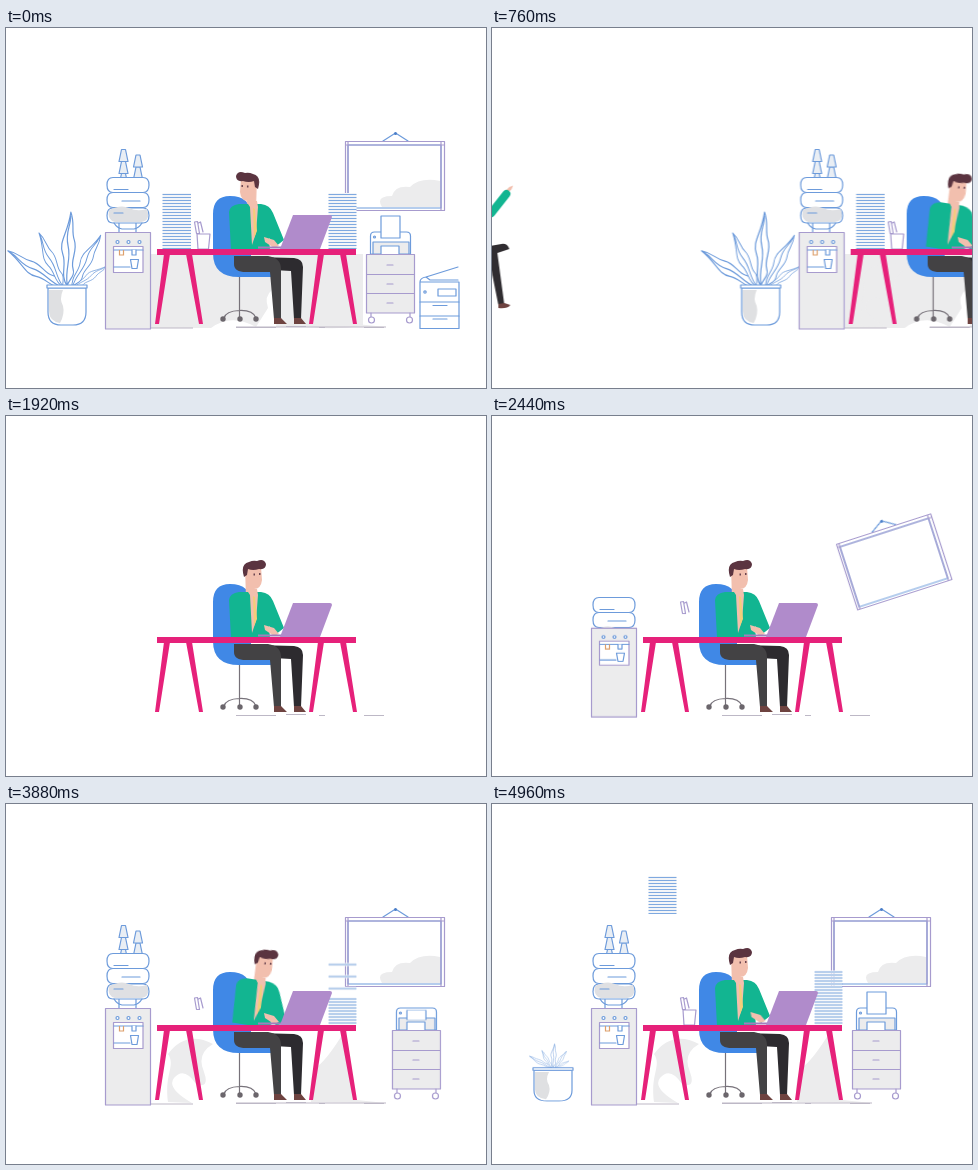
These frames come from a looping animation (480 px wide and 360 px high, 5000 ms). An HTML page without scripts:

```html
<!DOCTYPE html>
<html lang="en">
<head>
<meta charset="utf-8">
<title>Office assembly</title>
<style>
html, body { margin: 0; width: 100%; height: 100%; overflow: hidden; background: #fff; }
svg { display: block; width: 100%; height: 100%; }

:root { --blue: #6d9bdb; --violet: #a79bce; --grey: #ececed; --pink: #e6217a; --teal: #12b591; --skin: #f2bfae; --hair: #5b3440; --chair: #4088e6; }
.blue, .violet { fill: #fff; stroke: var(--blue); stroke-width: 1.2; stroke-linejoin: round; stroke-linecap: round; }
.violet { stroke: var(--violet); }
.line { fill: none; }
.grey { fill: var(--grey); }
.pink { fill: var(--pink); }
.teal { fill: var(--teal); }
.skin { fill: var(--skin); }
.hair { fill: var(--hair); }
.chair { fill: var(--chair); }
.limb { fill: none; stroke-linecap: round; stroke-linejoin: round; }

/* One 5 s clock for everything: 1% = 50 ms */
.a { animation: 5s linear infinite; }

.slide { animation-name: slide; }
@keyframes slide {
  0%, 8% { transform: none; }
  11.2% { transform: translateX(62px); }
  15.2% { transform: translateX(207px); }
  23.2%, 24% { transform: translateX(480px); }
  24.01%, 100% { transform: none; }
}

.station { animation-name: station; }
@keyframes station { 0%, 24% { opacity: 1; } 24.01%, 37.5% { opacity: 0; } 37.51%, 100% { opacity: 1; } }

.first { animation-name: first; }
@keyframes first { 0%, 24% { opacity: 1; } 24.01%, 100% { opacity: 0; } }

.lean { animation-name: lean; transform-origin: 248px 228px; }
@keyframes lean {
  0%, 4% { transform: none; }
  8%, 24% { transform: rotate(9deg); }
  36%, 50% { transform: none; }
  57%, 88% { transform: rotate(9deg); }
  96%, 100% { transform: none; }
}
.turn { animation-name: turn; transform-origin: 245px 160px; }
@keyframes turn { 0%, 4% { transform: scaleX(-1); } 4.01%, 100% { transform: none; } }
.type { animation: type .24s steps(2) infinite; }
@keyframes type { to { transform: translate(1px, -2px); } }

.boss { animation-name: boss; }
@keyframes boss {
  0%, 8% { transform: translateX(-443px); opacity: 1; }
  15.2% { transform: translateX(-236px); }
  23.2% { transform: translateX(-90px); }
  27%, 37.5% { transform: none; opacity: 1; }
  37.51%, 100% { transform: none; opacity: 0; }
}
.point { animation-name: point; transform-origin: 235px 185px; }
@keyframes point { 0%, 28% { transform: none; } 31% { transform: rotate(8deg); } 34%, 100% { transform: none; } }
.front { animation-name: front; }
@keyframes front {
  0%, 22.8% { transform: translateX(340px); opacity: 1; }
  27%, 37.5% { transform: none; opacity: 1; }
  37.51%, 100% { opacity: 0; }
}
.panel { animation-name: panel; transform-origin: 0 221px; }
@keyframes panel { 0%, 34.4% { transform: none; } 37.5%, 100% { transform: scaleY(.12); } }

.board { animation-name: board; transform-origin: 389px 105px; }
@keyframes board {
  0%, 24% { transform: none; opacity: 1; }
  24.01%, 40% { transform: scale(.2); opacity: 0; }
  40.01% { transform: scale(.2) rotate(10deg); opacity: 1; }
  44% { transform: rotate(6deg); }
  48.8% { transform: rotate(-18deg); }
  54% { transform: rotate(9deg); }
  59% { transform: rotate(-6deg); }
  62% { transform: rotate(2deg); }
  64% { transform: rotate(-2deg); }
  68%, 100% { transform: none; opacity: 1; }
}
.gleam { animation-name: gleam; }
@keyframes gleam { 0%, 24% { opacity: 1; } 24.01%, 73% { opacity: 0; } 73.01%, 100% { opacity: 1; } }

.cooler { animation-name: cooler; transform-origin: 0 301px; }
@keyframes cooler {
  0%, 24% { transform: none; opacity: 1; }
  24.01%, 45% { transform: scaleY(.6); opacity: 0; }
  45.01% { transform: scaleY(.6); opacity: 1; }
  48.8% { transform: scaleY(.92); }
  64% { transform: scaleY(.98); }
  70%, 100% { transform: none; opacity: 1; }
}
.jug { animation-name: jug; }
@keyframes jug {
  0%, 24% { transform: none; opacity: 1; }
  24.01%, 45% { transform: translateY(50px); opacity: 0; }
  45.01% { transform: translateY(50px); opacity: 1; }
  48.8% { transform: translateY(32px); }
  64% { transform: translateY(9px); }
  70%, 100% { transform: none; opacity: 1; }
}
.cups { animation-name: cups; }
@keyframes cups {
  0%, 24% { transform: none; opacity: 1; }
  24.01%, 54% { transform: translateY(-60px); opacity: 0; }
  54.01% { transform: translateY(-60px); opacity: 1; }
  64% { transform: translateY(var(--mid)); }
  70%, 100% { transform: none; opacity: 1; }
}
.pens { animation-name: pens; }
@keyframes pens {
  0%, 24% { transform: none; opacity: 1; }
  24.01%, 45% { transform: translateY(-14px); opacity: 0; }
  45.01% { transform: translateY(-14px); opacity: 1; }
  48.8% { transform: translateY(-8px); }
  54%, 100% { transform: none; opacity: 1; }
}
.mug { animation-name: mug; }
@keyframes mug { 0%, 24% { opacity: 1; } 24.01%, 90% { opacity: 0; } 90.01%, 100% { opacity: 1; } }

.pile { animation-name: pile; }
@keyframes pile {
  0%, 56.8% { transform: translateY(-24px); opacity: 0; }
  56.81% { transform: translateY(-24px); opacity: 1; }
  60%, 100% { transform: none; opacity: 1; }
}
.pile use { animation: fall 5s linear calc(var(--i) * 46ms - 5s) infinite; }
.pile .late { animation: lateFall 5s linear calc(var(--i) * 46ms - 4.6s) infinite; }
@keyframes fall {
  0%, 60.1% { transform: translateY(calc(var(--i) * -3px - 98px)); }
  70.1%, 100% { transform: translateY(calc(var(--i) * -3px)); }
}
@keyframes lateFall {
  0%, 60.1% { transform: translateY(calc(var(--i) * -3px - 60px)); opacity: 0; }
  60.11% { opacity: 1; }
  66%, 100% { transform: translateY(calc(var(--i) * -3px)); opacity: 1; }
}
.hang { animation-name: hang; }
@keyframes hang {
  0%, 92% { transform: translateY(-14px); opacity: 0; }
  92.01% { transform: translateY(-14px); opacity: 1; }
  99%, 100% { transform: none; opacity: 1; }
}

.cabinet { animation-name: cabinet; }
@keyframes cabinet {
  0%, 24% { transform: none; opacity: 1; }
  24.01%, 73% { transform: translateX(69px); opacity: 0; }
  73.01% { transform: translateX(69px); opacity: 1; }
  77.6% { transform: translateX(26px); }
  82%, 100% { transform: none; opacity: 1; }
}
.paper { animation-name: paper; transform-origin: 0 210px; }
@keyframes paper {
  0%, 24% { transform: none; }
  24.01%, 78% { transform: translateY(6px) scaleY(.45); }
  85%, 100% { transform: none; }
}

.pot { animation-name: pot; transform-origin: 0 297px; }
@keyframes pot {
  0%, 24% { transform: none; opacity: 1; }
  24.01%, 84% { transform: scaleY(.1); opacity: 0; }
  84.01% { transform: scaleY(.1); opacity: 1; }
  90%, 100% { transform: scaleY(.83); opacity: 1; }
}
.leaves { animation-name: leaves; transform-origin: 61px 266px; }
@keyframes leaves {
  0%, 24% { transform: none; opacity: 1; }
  24.01%, 91% { transform: scale(.02); opacity: 0; }
  91.01% { transform: scale(.02); opacity: 1; }
  99%, 100% { transform: scale(.4, .32); opacity: 1; }
}
</style>
</head>
<body>
<svg viewBox="0 0 480 360">
  <defs>
    <pattern id="sheets" width="40" height="3" patternUnits="userSpaceOnUse">
      <path fill="#f3f5f8" d="M0 0h40v3H0z"/>
      <path stroke="#7fa9e0" d="M0 1.5h40"/>
    </pattern>
    <g id="sheet">
      <path fill="#f3f5f8" d="M323 217.500h27v3h-27z"/>
      <path stroke="#7fa9e0" d="M322.500 219H350.500"/>
    </g>
    <path id="cup" class="blue" style="fill:#e9eef4" d="M2.500 0h4l2.500 12h-9z"/>
    <g id="tower">
      <use href="#cup" y="48"/><use href="#cup" y="36"/><use href="#cup" y="24"/><use href="#cup" y="12"/><use href="#cup"/>
    </g>
    <path id="leaf" class="blue" d="M0 0C-8-12-1-20-6-32S-2-52 0-74C5-62 1-56 5-46S2-26 5-18 2-8 0 0M0-2C-3-18 3-26-1-40S1-60 0-70"/>
    <path id="lobe" class="blue" d="M107 0h30q6 0 6 7.500t-6 7.500h-30q-6 0-6-7.500t6-7.500z"/>
    <path id="deskLegs" class="pink" d="M158 226h6l-11 70h-4zM180 226h6l11 70h-4z"/>
  </defs>

  <g class="a slide">
    <path class="a first grey" d="M145 226H357V298Q330 302 300 299H270Q274 270 266 262 258 268 262 280L250 299Q225 285 205 300H145z"/>
    <g class="a gleam grey">
      <path d="M162 298C158 270 170 262 162 250Q180 226 207 240 190 250 198 268 204 285 190 280 178 262 168 274 160 284 186 299z"/>
      <path d="M305 298Q302 270 312 262T338 228L350 296 380 299z"/>
    </g>
    <g fill="none" stroke="#bdb8c6" stroke-width="1.200">
      <path class="a station" d="M230 299.500h40M280 298.500h20M313 299.500h6M358 299.500h20"/>
      <path class="a gleam" d="M145 300h42M230 299h150"/>
    </g>

    <g class="a board">
      <path class="blue line" d="M377 113l12.500-8 12.500 8"/>
      <circle cx="389.500" cy="105.500" r="1.500" fill="#4b7ec8"/>
      <path class="violet" d="M339.500 113.500h99v69h-99z"/>
      <path class="blue" d="M342 117h93v63h-93z"/>
      <path class="a gleam grey" d="M376 179Q369 168 386 168 389 157 404 159 414 149 434 153V179z"/>
      <path class="violet line" d="M340 117h98M435 114v68M342 114v68"/>
    </g>

    <g class="a leaves">
      <use href="#leaf" transform="translate(57 260) rotate(-56) scale(.9)"/>
      <use href="#leaf" transform="translate(67 260) rotate(57) scale(.55)"/>
      <use href="#leaf" transform="translate(57 259) rotate(-24) scale(.8)"/>
      <use href="#leaf" transform="translate(66 259) rotate(29) scale(.8)"/>
      <use href="#leaf" transform="translate(61 258) rotate(3) scale(1)"/>
    </g>
    <g class="a pot">
      <path class="blue" d="M42 260v24q0 13 13 13h12q13 0 13-13v-24z"/>
      <path fill="#dfe0e2" d="M43 262h14q-4 9 0 16 2 8-3 17-11-2-11-12z"/>
      <path class="blue" d="M41 257h40v3H41z"/>
    </g>

    <g class="a cups" style="--mid:-19px"><use href="#tower" x="113" y="121.500"/></g>
    <g class="a cups" style="--mid:-2px"><use href="#tower" x="127.500" y="127"/></g>
    <g class="a jug">
      <path class="blue" d="M113 194h17v11h-17z"/>
      <use href="#lobe" y="149.500"/><use href="#lobe" y="164.500"/><use href="#lobe" y="180"/>
      <path fill="#dfe0e3" d="M103 182q12-6 20-2t18 1q4 12-6 13h-26q-8-2-6-12z"/>
      <path class="blue line" d="M108 161.500h14M116 173h18M108 185h9M108 195q3 5 8 6h12q5-1 8-6"/>
    </g>
    <g class="a cooler">
      <path class="violet" style="fill:var(--grey)" d="M99.500 204.500h45v96.500h-45z"/>
      <path class="violet" d="M107.500 218.500h29.500v26h-29.500z"/>
      <path class="blue line" d="M108 222h29M108 239h16"/>
      <g class="blue"><circle cx="111.500" cy="214" r="1.500"/><circle cx="122.500" cy="214" r="1.500"/><circle cx="133.500" cy="214" r="1.500"/></g>
      <path class="line" stroke="#dda06c" stroke-width="1.200" d="M113.500 222v5h4v-5"/>
      <path class="blue" d="M126 222v5h4v-5M124.500 231.500h8l-1.500 9h-5z"/>
    </g>

    <rect class="a first" x="156.500" y="165" width="28.500" height="56" fill="url(#sheets)"/>
    <rect class="a hang" x="156.500" y="72" width="28" height="38" fill="url(#sheets)"/>
    <rect class="a first" x="322.500" y="165" width="28" height="56" fill="url(#sheets)"/>
    <g class="a pile">
      <use href="#sheet" style="--i:0"/><use href="#sheet" style="--i:1"/><use href="#sheet" style="--i:2"/>
      <use href="#sheet" style="--i:3"/><use href="#sheet" style="--i:4"/><use href="#sheet" style="--i:5"/>
      <use href="#sheet" style="--i:6"/><use href="#sheet" style="--i:7"/><use href="#sheet" style="--i:8"/>
      <use href="#sheet" style="--i:9"/><use href="#sheet" style="--i:10"/><use href="#sheet" style="--i:11"/>
      <use href="#sheet" class="late" style="--i:12"/><use href="#sheet" class="late" style="--i:13"/>
      <use href="#sheet" class="late" style="--i:14"/><use href="#sheet" class="late" style="--i:15"/>
      <use href="#sheet" class="late" style="--i:16"/><use href="#sheet" class="late" style="--i:17"/>
    </g>

    <path class="a pens violet" d="M188.500 194l3-.5 2 12h-3zM192.500 195l2-1 2.500 10"/>
    <path class="a mug violet" d="M191 206h13l-1.500 15h-10.500z"/>

    <g class="a cabinet">
      <path class="blue" d="M364.500 226v-18q0-4 4-4h32q4 0 4 4v18z"/>
      <path class="blue" style="fill:var(--grey)" d="M367 214h36v12h-36z"/>
      <path class="blue" d="M375 226v-8h18v8"/>
      <path class="a paper blue" d="M375 188h19v22h-19z"/>
      <circle cx="368.500" cy="209" r="1" class="blue"/>
      <path class="violet" style="fill:var(--grey)" d="M360.500 226.500h48v58.500h-48z"/>
      <path class="violet line" d="M360.500 246.500h48M360.500 265.500h48M381 237h6M381 256h6M381 275h6M365 285v4M404 285v4"/>
      <g class="violet"><circle cx="365.500" cy="292" r="3"/><circle cx="403.500" cy="292" r="3"/></g>
    </g>

    <g class="a first">
      <path class="blue" d="M414 254h39v46.500h-39zM414 254q0-4 6-5l32-10M420 249l4 3h28"/>
      <path class="blue" d="M432 261h18v7h-18zM414 274h39M414 288h39M427 277.500h14M427 291h14"/>
      <circle cx="419" cy="264" r="1.200" class="blue"/>
    </g>

    <g class="a station">
      <g fill="none" stroke="#77727a" stroke-width="1.200"><path d="M233.500 249v41M218 290q2-7 15.500-7.500T250 290"/></g>
      <g fill="#6b666c"><circle cx="217" cy="291" r="2.700"/><circle cx="234" cy="291" r="2.700"/><circle cx="250" cy="291" r="2.700"/></g>
      <path class="chair" d="M207 186q0-18 17-18 21 0 21 20v45h22v16h-34q-26 0-26-24z"/>
      <path fill="#2d2b2f" d="M250 229l38 1q9 1 9 9l-2 52h-7l-3-48-35-2z"/>
      <path fill="#434244" d="M228 228h34q13 2 13 13v50h-7l-4-47h-24q-12 0-12-8z"/>
      <path fill="#6e4340" d="M268 290h7l6 6h-13zM288 290h7l5 6h-12z"/>

      <g class="a lean">
        <g class="a turn">
          <path class="skin" d="M239 151q8-6 16 0l1 13q-1 9-8 9l2 9h-10z"/>
          <path class="hair" d="M238 161q-4-13 5-15 4-2 8-1 7-3 9 3 0 6-7 5-6 2-11 0l-1 6z"/>
          <path fill="#6a4550" d="M247.500 157.500h1.500v2h-1.500zM253 157h1.500v2h-1.500z"/>
        </g>
        <path class="teal" d="M223 184q1-7 10-8h22q9 1 12 9l11 27-9 7-6-9 1 12h-39z"/>
        <path class="skin" d="M240 173h11l1 6-2 26-4 12-2-38z"/>
        <path fill="#f1cf7a" d="M247 180l2 1 2 22-3 7z"/>
      </g>
      <path class="type skin" d="M258 209l10 3 5 6-5 2-9-6z"/>

      <path class="pink" d="M151 221h199v6H151z"/>
      <use href="#deskLegs"/><use href="#deskLegs" x="154"/>
      <path fill="#9f80bd" d="M252 218.500h25v2h-25z"/>
      <path fill="#b08bcb" d="M287 187h37q2 0 2 2l-12 32h-40z"/>
    </g>
  </g>

  <g class="a boss">
    <path class="chair" d="M161 222l-4-30q0-22 18-23 8 0 12 8l8 45z"/>
    <g fill="#66736f"><circle cx="174" cy="290" r="2.300"/><circle cx="190" cy="290" r="2.300"/><circle cx="206" cy="290" r="2.300"/></g>
    <path fill="#302d31" d="M205 223l40-7q6-1 8 5l-12 4 7 52h-6l-10-50-27 4z"/>
    <path fill="#6e4340" d="M242 276l6-1 6 2q-3 4-12 3z"/>
    <path class="teal" d="M167 185q0-6 8-7l20-4q10-1 14 8l10 40h-39z"/>
    <path class="skin" d="M171 153q11-7 18 0l2 12q0 8-5 8l4 7-10 2-3-12q-6-8-6-17z"/>
    <path class="hair" d="M169 162q-4-9 4-13 3-3 5-2 5-7 9-1 1 5-5 6-5-1-7 3l0 7q-3 3-6 0z"/>
    <path fill="#6a4550" d="M181 157h1.500v2H181zM186.500 156h1.500v2h-1.500z"/>
    <path fill="#f3c33f" d="M188 181l3-1 9 24-4 3z"/>
    <path class="limb" stroke="#12b591" stroke-width="9" d="M196 180q18-1 38 5"/>
    <g class="a point">
      <path class="skin" d="M249 163l4-4 4-1.500-2 4-4 4z"/>
      <path class="limb" stroke="#12b591" stroke-width="8" d="M235 185l15-19"/>
    </g>
    <path class="limb" stroke="#0da382" stroke-width="7" d="M182 217l18-7 15-11"/>
    <path fill="#f3c33f" d="M198 214l6-3-2 6z"/>
  </g>

  <g class="a front pink">
    <path d="M162 273h4v24h-3zM180 273h4l-1 24h-3zM316 273h4v24h-3zM334 273h4l-1 24h-4z"/>
    <rect class="a panel" x="151" y="221" width="199" height="53"/>
  </g>
</svg>
</body>
</html>
```
